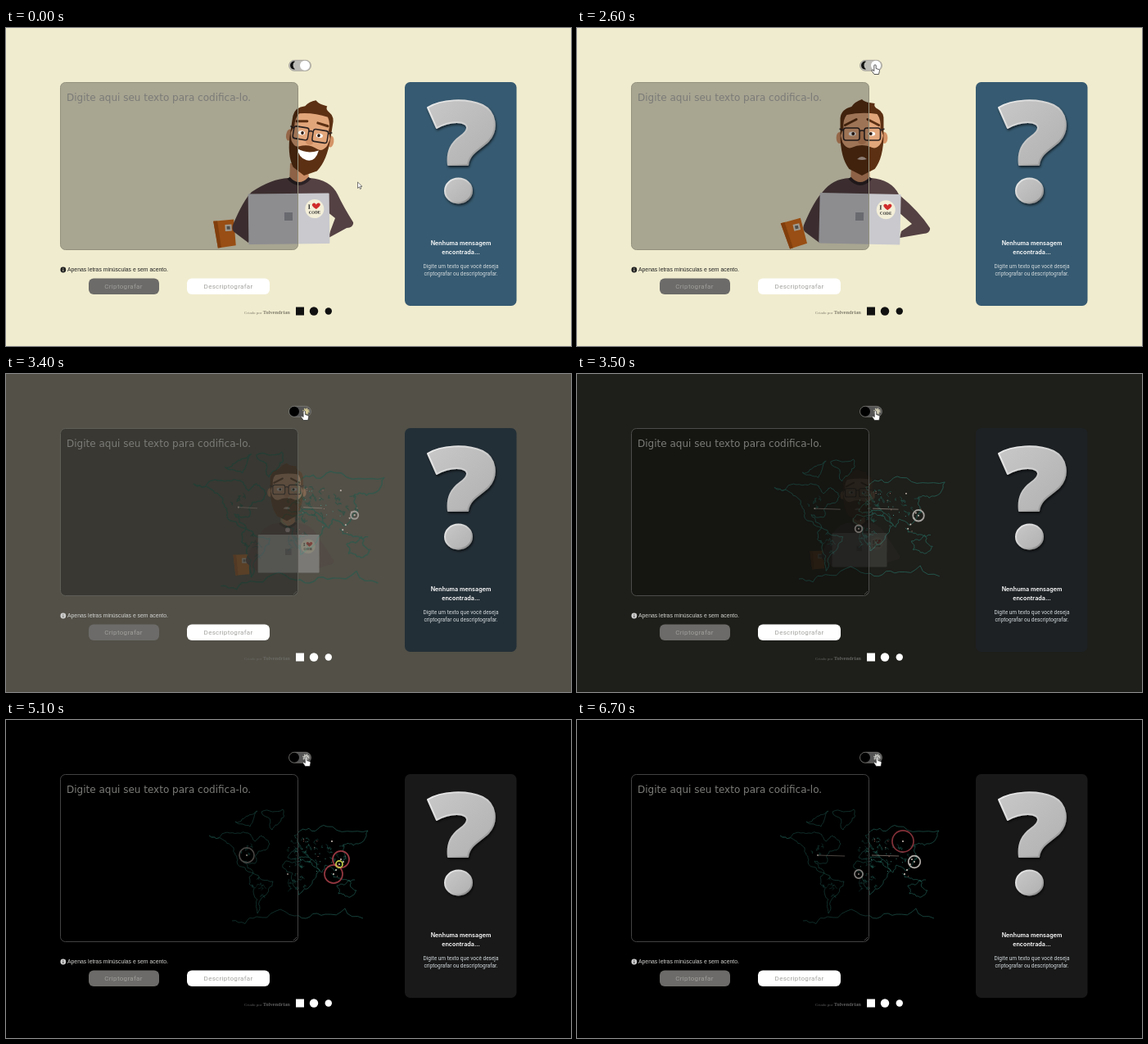
An HTML page that plays this animation: 690 px wide and 388 px high, repeating every 6.8 s.

```html
<!DOCTYPE html>
<html lang="pt-BR">
<head>
<meta charset="utf-8">
<title>Codificador</title>
<style>
html, body { margin: 0; width: 100%; height: 100%; overflow: hidden; background: #f0eccf; }
svg { display: block; width: 690px; height: 388px; }
.mid { text-anchor: middle; }
.ph { font: 12px "DejaVu Sans", sans-serif; fill: #7b7b78; }
.note { font: 6.85px "Liberation Sans", sans-serif; }
.btn { font: 8px Roboto, sans-serif; letter-spacing: .3px; }
.head { font: 600 7.2px Inter, sans-serif; fill: #fff; }
.sub { font: 6.5px Roboto, sans-serif; fill: #d3dadd; }
.foot { font: 5px "Liberation Serif", serif; }
.foot .by { font-weight: bold; font-size: 6.4px; }
.code { font: bold 5px "Liberation Serif", serif; fill: #222; }
</style>
</head>
<body>
<svg viewBox="0 0 690 388">
  <defs>
    <linearGradient id="metal" x1="0" y1="0" x2="1" y2="1">
      <stop offset="0" stop-color="#c8c8c8"/><stop offset="1" stop-color="#b0b0b0"/>
    </linearGradient>
    <linearGradient id="edge" x1="0" y1="0" x2="1" y2="1">
      <stop offset="0" stop-color="#eee"/><stop offset=".5" stop-color="#ccc"/><stop offset="1" stop-color="#777"/>
    </linearGradient>
    <filter id="drop" x="-20%" y="-20%" width="140%" height="140%">
      <feDropShadow dx="1" dy="2" stdDeviation="1.6" flood-color="#000" flood-opacity=".65"/>
    </filter>
  </defs>

  <rect id="bg" width="690" height="388"/>

  <g id="map" fill="none" stroke-linejoin="round">
    <path id="coast"/>
    <path id="borders"/>
    <g id="dots"></g>
    <g id="beams" stroke="#9b8f86" stroke-width=".7"></g>
    <g id="rings" stroke-width="1.700"></g>
  </g>

  <g id="man">
    <g id="cup">
      <path d="M-13-16 12-17 13 15-9 17Z" fill="#d9701c"/>
      <path d="M-13-16-9 17-5 16.500-8-16Z" fill="#b95813"/>
      <rect x="1" y="-11" width="8" height="8" fill="#e5dccd"/>
      <rect x="3" y="-9" width="4" height="4" fill="#71706c"/>
    </g>
    <path id="neck" fill="#c98c64"/>
    <path id="body" fill="#544143"/>
    <path id="collar" fill="none" stroke="#2c2225" stroke-width="4"/>
    <g id="face">
      <ellipse cx="-28" cy="-46" rx="4" ry="7" fill="#d59467"/>
      <ellipse cx="28" cy="-46" rx="4" ry="7" fill="#d59467"/>
      <path d="M-26-74Q0-88 26-74L26-38Q18-14 0-12Q-18-14-26-38Z" fill="#e2a67b"/>
      <path d="M-27-48V-70Q-26-81-13-84Q-9-90 0-93Q3-90 9-89L16-88Q14-84 20-81Q28-77 27-66V-48L23-58Q24-68 19-75Q0-78-19-74Q-24-68-23-58Z" fill="#5c3013"/>
      <path d="M-27-50-24-40Q-19-32-13-34Q0-40 13-34Q19-32 24-40L27-50Q27-22 16-8L0 0-16-8Q-27-22-27-50Z" fill="#5c3013"/>
      <path d="M-2-54-5-40Q0-36 5-40L2-54Z" fill="#cf8d62"/>
      <g fill="#fff"><ellipse cx="-12" cy="-51" rx="4.500" ry="2.600"/><ellipse cx="12" cy="-51" rx="4.500" ry="2.600"/></g>
      <circle cx="-11" cy="-51" r="2" fill="#2c1a10"/><circle cx="11" cy="-51" r="2" fill="#2c1a10"/>
      <path id="brows" fill="none" stroke="#5c3013" stroke-width="3" stroke-linecap="round"/>
      <g fill="none" stroke="#2c2322" stroke-width="1.600">
        <rect x="-23" y="-58" width="20" height="15" rx="3"/><rect x="3" y="-58" width="20" height="15" rx="3"/>
        <path d="M-3-54Q0-56 3-54M-23-55-28-57M23-55 28-57"/>
      </g>
      <path id="smile" d="M-14-31Q0-26 14-33Q12-18 0-19Q-11-20-14-31Z" fill="#fff"/>
      <path id="frown" d="M-6-20Q0-26 6-20Q0-18-6-20Z" fill="#c9b3a6"/>
    </g>
    <g id="laptop">
      <rect x="296" y="202" width="99" height="61.500" rx="1" fill="#c9c9ce"/>
      <rect x="340" y="225" width="10" height="10" fill="#9697a0"/>
      <circle cx="377" cy="221" r="11.500" fill="#f3eed8"/>
      <text class="code" x="369" y="221" style="font-size:8px">I</text>
      <path d="M379 221.500Q371 216 375.500 214Q378 213.500 379 216Q380 213.500 382.500 214Q387 216 379 221.500Z" fill="#d02b2b"/>
      <text class="code mid" x="377" y="227">CODE</text>
    </g>
  </g>

  <rect id="area" x="66.500" y="66.500" width="290" height="204" rx="6" fill="#000" fill-opacity=".3"/>
  <path id="grip" d="M351 269 355 265M353.500 269 355 267.500" stroke="#777" stroke-width=".6"/>
  <text class="ph" x="74" y="88.600">Digite aqui seu texto para codifica-lo.</text>

  <g id="switch">
    <rect id="pill" x="345.500" y="39.300" width="27" height="13" rx="6.500" stroke="#8d8c86" stroke-width=".6"/>
    <path id="moon" d="M353 40.700A5 5 0 1 0 353 50.500A6 6 0 0 1 353 40.700Z" fill="#111"/>
    <g id="sun">
      <circle cx="366.500" cy="45.600" r="2.700"/>
      <circle cx="366.500" cy="45.600" r="3.700" fill="none" stroke-width="1.200" stroke-dasharray="1.450"/>
    </g>
    <circle id="ball" cy="45.700" r="6"/>
  </g>

  <rect id="panel" x="487" y="66" width="136.500" height="273" rx="6.500"/>
  <g filter="url(#drop)" fill="url(#metal)" stroke="url(#edge)" stroke-width="2" stroke-linejoin="round">
    <path d="M515 97C531 87 562 85 582 94C598 102 602 124 589 138C579 148 566 152 564 167L540 167C538 150 544 140 555 132C565 125 566 118 556 115.500C545 114 535 117 526 122Z"/>
    <ellipse cx="552.500" cy="198.500" rx="16.500" ry="15"/>
  </g>
  <g class="mid">
    <text class="head" x="555.500" y="264.500">Nenhuma mensagem</text>
    <text class="head" x="555.500" y="275.500">encontrada...</text>
    <text class="sub" x="555.500" y="292.500">Digite um texto que você deseja</text>
    <text class="sub" x="555.500" y="301.800">criptografar ou descriptografar.</text>
  </g>

  <circle id="info" cx="69.800" cy="295" r="3.400"/>
  <path id="infoMark" d="M69.800 293V293.800M69.800 294.600V297" stroke-width=".9"/>
  <text class="note" id="note" x="75" y="297.400">Apenas letras minúsculas e sem acento.</text>

  <rect x="101" y="305.500" width="86" height="19.500" rx="6" fill="#6c6b69"/>
  <text class="btn mid" x="143.500" y="318" fill="#a09f9c">Criptografar</text>
  <rect x="221" y="305.500" width="101" height="19.500" rx="6" fill="#fff"/>
  <text class="btn mid" x="271.500" y="318" fill="#a3a3a0">Descriptografar</text>

  <text class="foot" id="foot" x="291" y="348.500">Criado por <tspan class="by">Tolvendrian</tspan></text>
  <g id="links">
    <rect x="354" y="340.500" width="10" height="10"/>
    <circle cx="376" cy="345.500" r="5.200"/>
    <circle cx="393.800" cy="345.500" r="4.200"/>
  </g>

  <path id="arrow" d="M0 0V7.500L1.800 5.900 3 8.500 4.200 8 3.100 5.400H5.500Z" fill="#fff" stroke="#444" stroke-width=".7"/>
  <path id="hand" d="M-1.200 0Q0-1.400 1.200 0V4L4.600 5Q5.700 5.400 5.400 7L4.500 11H-1L-4.300 6.500Q-3.800 5-2.500 6L-1.200 7Z" fill="#fff" stroke="#333" stroke-width=".8"/>
</svg>

<script>
const LOOP = 6800, STEP = 100, FADE = 3208, PULSE = 3160;
const $ = id => document.getElementById(id);
const clamp = v => Math.max(0, Math.min(1, v));
const lerp = (a, b, k) => a + (b - a) * k;
const span = (t, from, to) => clamp((t - from) / (to - from));
const mix = (a, b, k) => `rgb(${a.map((v, i) => Math.round(lerp(v, b[i], k)))})`;
const set = (el, attrs) => {
  if (typeof el === "string") el = $(el);
  for (const k in attrs) el.setAttribute(k, attrs[k]);
};
const add = (parent, tag, attrs = {}) => {
  const el = document.createElementNS("http://www.w3.org/2000/svg", tag);
  set(el, attrs);
  return $(parent).appendChild(el);
};

let seed = 11;
const rnd = () => (seed = seed * 16807 % 2147483647) / 2147483647;
const spread = () => rnd() * 2 - 1;

// CSS "ease"
function ease(x) {
  if (x <= 0 || x >= 1) return clamp(x);
  const bez = (a, b, u) => 3 * a * u * (1 - u) ** 2 + 3 * b * u * u * (1 - u) + u ** 3;
  let lo = 0, hi = 1;
  for (let i = 0; i < 20; i++) {
    const u = (lo + hi) / 2;
    if (bez(.25, .25, u) < x) lo = u; else hi = u;
  }
  return bez(.1, 1, lo);
}

// Coastline from a few key points, roughened by midpoint displacement
function rough(a, b, depth) {
  if (!depth) return "L" + b.map(v => v.toFixed(1));
  const bend = .22 * spread();
  const m = [(a[0] + b[0]) / 2 + (b[1] - a[1]) * bend, (a[1] + b[1]) / 2 - (b[0] - a[0]) * bend];
  return rough(a, m, depth - 1) + rough(m, b, depth - 1);
}
function coast(text) {
  const pts = text.split(" ").map(p => p.split(",").map(Number));
  return "M" + pts[0] + pts.slice(1).map((p, i) => rough(pts[i], p, 3)).join("");
}
set("coast", { d: [
  "248,141 270,137 296,138 304,148 312,141 322,151 305,165 303,175 290,172 302,187 282,173 278,156 262,144 248,141",
  "312,112 338,109 335,124 325,134 312,112",
  "280,124 296,117 307,111 298,130 280,124",
  "302,187 326,197 315,215 307,236 303,214 297,200 302,187",
  "343,172 369,173 383,184 370,204 357,213 350,187 338,180 343,172",
  "344,168 358,151 352,141 362,133 392,130 442,135 424,153 412,152 414,170 402,184 390,177 386,186 378,174 361,167 344,168",
  "404,202 419,195 428,208 423,214 406,212 404,202",
  "397,187 406,193 426,195",
  "276,245 306,240 352,239 390,237 436,242"
].map(coast).join("") });

// Country borders: short random walks around each populated area
let walks = "";
for (const [x, y, w, h, n] of [[358, 154, 15, 11, 16], [357, 190, 13, 20, 18], [389, 164, 24, 13, 16], [290, 161, 13, 9, 5], [311, 206, 8, 13, 7]]) {
  for (let i = 0; i < n; i++) {
    walks += `M${x + w * spread()} ${y + h * spread()}`;
    for (let j = 0; j < 4; j++) walks += `l${3.2 * spread()} ${3.2 * spread()}`;
  }
}
set("borders", { d: walks });

for (let i = 0; i < 24; i++) {
  add("dots", "circle", { cx: 375 + 40 * spread(), cy: 170 + 25 * spread(), r: .5, fill: i % 3 ? "#4fa596" : "#c98a80" });
}

// Hubs send out a ring again and again: x, y, delay, colour
const RED = "#b94450", PALE = "#c4bfbb";
const hubs = [
  [344, 188, 130, PALE], [412, 173, 40, PALE], [403, 183, 800, RED], [294, 165, 1530, "#77716f"],
  [409, 170, 1490, RED], [400, 188, 1450, RED], [407, 176, 1730, "#c9d048"], [398, 148, 2970, RED]
].map(([cx, cy, delay, stroke]) => {
  add("dots", "circle", { cx, cy, r: .9, fill: "#e4d5cd" });
  return { delay, el: add("rings", "circle", { cx, cy, stroke }) };
});
const beams = [294, 360].map(x1 => ({ x1, el: add("beams", "line", { x1, y1: 165, y2: 166 }) }));

function drawMap(t) {
  const since = t - FADE;
  for (const { delay, el } of hubs) {
    const age = since < delay ? 0 : (since - delay) % PULSE;
    set(el, { r: age / 40, opacity: age < 800 ? 1 - .7 * (age / 800) ** 2 : 0 });
  }
  const flight = Math.max(0, since) % PULSE;
  for (const { x1, el } of beams) set(el, { x2: x1 + flight / 10, opacity: flight < 500 ? 1 : 0 });
}

function drawMan(t) {
  const worry = span(t, 1200, 1600), calm = span(t, 2600, 3200);
  const sway = -3 * worry * Math.cos(Math.PI * (t - 1600) / 1000);
  const hx = lerp(364, 345, worry) + sway, n = lerp(358, 345, worry) + sway / 3;
  const ex = 424 + 4 * worry + sway - 7 * calm, ey = 240 + 7 * worry;
  set("face", { transform: `translate(${hx} 180) rotate(${9 * (1 - worry)}) scale(${lerp(.92, .98, worry)} 1)` });
  set("cup", { transform: `translate(${267 - 2 * worry + 4 * calm} 251) rotate(${-(3 + 10 * worry) * (1 - calm)})` });
  set("laptop", { transform: `rotate(${(2 * worry - .7) * (1 - calm)} 345 232)` });
  set("neck", { d: `M${n - 11} 165H${n + 11}L${n + 12} 190H${n - 12}Z` });
  set("body", { d: `M${n - 13} 183Q${n} 196 ${n + 13} 183Q${n + 38} 185 ${n + 47} 203Q${ex - 12} ${ey - 22} ${ex} ${ey - 3}` +
    `Q${ex + 1} ${ey + 3} ${ex - 8} ${ey + 4}L394 256 396 248 ${ex - 22} ${ey - 8} 392 224V256H300L296 262 280 250` +
    `Q274 246 278 238Q290 210 300 200Q${n - 34} 184 ${n - 13} 183Z` });
  set("collar", { d: `M${n - 13} 183Q${n} 197 ${n + 13} 183` });
  const lift = 2.5 * worry;
  set("brows", { d: `M-21 ${lift - 64}L-7 ${-66 - lift}M7 ${-66 - lift}L21 ${lift - 64}` });
  set("smile", { opacity: worry < .5 ? 1 : 0 });
  set("frown", { opacity: worry < .5 ? 0 : 1 });
}

function drawPointer(t) {
  const go = ease(span(t, 1900, 2500)), over = go === 1;
  const x = lerp(429.5, 364, go) + 2.5 * span(t, 3200, 5000);
  const y = lerp(188 - 12 * span(t, 1200, 1600), 45.5, go);
  set("arrow", { transform: `translate(${x} ${y})`, opacity: over ? 0 : 1 });
  set("hand", { transform: `translate(${x} ${y})`, opacity: over ? 1 : 0 });
}

function draw(t) {
  const p = ease((t - FADE) / 500), dark = t > FADE;
  const slide = span(t, 3200, 3400), quick = span(t, 3200, 3320);
  const size = 1 - .37 * p;
  const zoom = s => `translate(344 177) scale(${s}) translate(-344 -177)`;

  set("bg", { fill: mix([240, 236, 207], [0, 0, 0], p) });
  set("panel", { fill: mix([54, 90, 113], [25, 25, 25], p) });
  set("man", { opacity: 1 - p, transform: zoom(size) });
  set("map", { opacity: p, transform: zoom(size / .63) });
  set("coast", { stroke: mix([40, 60, 45], [38, 108, 97], p), "stroke-width": .6 + (1 - p) * 1.8 });
  set("borders", { stroke: mix([50, 65, 50], [30, 92, 82], p), "stroke-width": .5 + (1 - p) });
  drawMan(t);
  drawMap(t);

  set("area", { stroke: mix([148, 146, 126], [66, 66, 66], p) });
  set("grip", { opacity: p });
  set("pill", { fill: mix([190, 188, 182], [84, 84, 84], quick) });
  set("moon", { opacity: 1 - quick });
  const sun = mix([226, 196, 50], [205, 205, 200], p);
  set("sun", { fill: sun, stroke: sun, opacity: quick });
  set("ball", { cx: lerp(365, 352, slide), fill: mix([255, 255, 255], [0, 0, 0], clamp(slide * 1.2)) });

  set("note", { fill: dark ? "#d4d4d2" : "#222" });
  set("info", { fill: mix([34, 34, 34], [205, 205, 205], quick) });
  set("infoMark", { stroke: mix([225, 222, 200], [30, 30, 30], p) });
  set("foot", { fill: mix([132, 129, 112], [92, 92, 92], p) });
  set("links", { fill: dark ? "#fff" : "#111" });
  drawPointer(t);
}

const start = performance.now();
let last = -1;
function tick() {
  const t = Math.floor(((performance.now() - start) % LOOP) / STEP) * STEP;
  if (t !== last) draw(last = t);
  requestAnimationFrame(tick);
}
tick();
</script>
</body>
</html>
```
